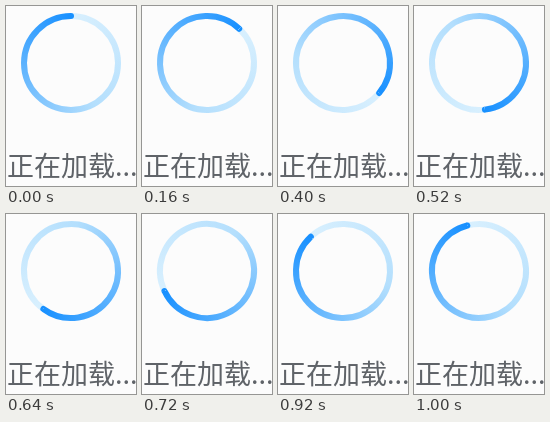
Animation of 130 by 180 pixels, one loop 1040 ms. Source, as an HTML page with a canvas:

```html
<!DOCTYPE html>
<html lang="zh-CN">
<head>
<meta charset="utf-8">
<style>
  html, body { margin: 0; width: 100%; height: 100%; overflow: hidden; background: #fcfcfc; }
  svg, canvas { position: absolute; left: 0; top: 0; }
  text { font: 27px "Noto Sans CJK SC", "Noto Sans CJK", sans-serif; fill: #5f6368; }
</style>
</head>
<body>
<canvas id="ring" width="130" height="180"></canvas>
<svg width="130" height="180"><text x="1" y="170">正在加载...</text></svg>
<script>
  const LOOP = 1040, STEP = 40, POSES = 25;
  const CX = 65, CY = 57, RADIUS = 47, WIDTH = 6;
  const HEAD = '#1890ff', MIDDLE = '#b4dffd', TAIL = '#d9f0fe';
  const ctx = document.getElementById('ring').getContext('2d');

  const sweep = ctx.createConicGradient(-Math.PI / 2, 0, 0);
  sweep.addColorStop(0, TAIL);
  sweep.addColorStop(0.42, MIDDLE);
  sweep.addColorStop(1, HEAD);

  function draw(pose) {
    ctx.clearRect(0, 0, 130, 180);
    ctx.save();
    ctx.translate(CX, CY);
    ctx.rotate(pose / POSES * 2 * Math.PI);
    ctx.lineWidth = WIDTH;
    ctx.strokeStyle = sweep;
    ctx.beginPath();
    ctx.arc(0, 0, RADIUS, 0, 2 * Math.PI);
    ctx.stroke();
    // Round cap leading the sweep
    ctx.fillStyle = HEAD;
    ctx.beginPath();
    ctx.arc(0, -RADIUS, WIDTH / 2, -Math.PI / 2, Math.PI / 2);
    ctx.fill();
    ctx.restore();
  }

  const start = performance.now();
  function tick() {
    const t = (performance.now() - start) % LOOP;
    // The first pose holds for two steps
    draw(Math.max(0, Math.floor(t / STEP) - 1));
    requestAnimationFrame(tick);
  }
  tick();
</script>
</body>
</html>
```
